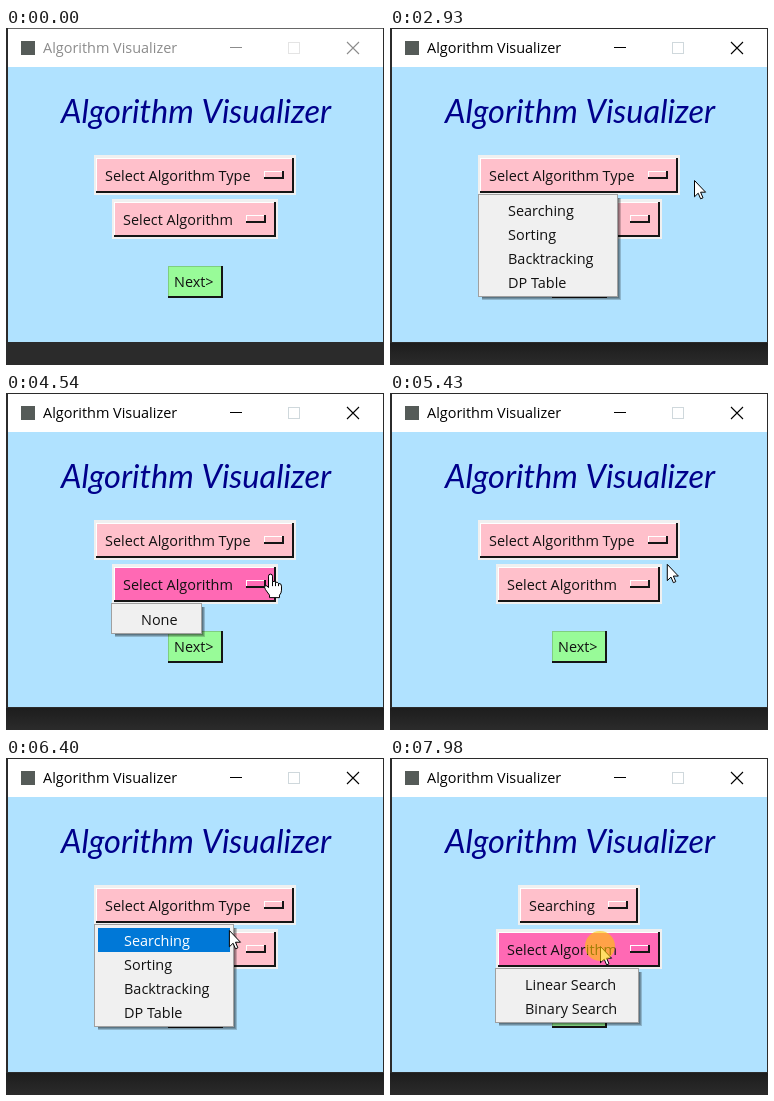
These frames come from a looping animation (378 px wide and 337 px high, 8000 ms). An HTML page with a canvas:

```html
<!DOCTYPE html>
<html lang="en">
<head>
<meta charset="utf-8">
<title>Algorithm Visualizer</title>
<style>
html, body { margin: 0; width: 100%; height: 100%; overflow: hidden; background: #2b2b2b; }
canvas { display: block; }
</style>
</head>
<body>
<canvas id="stage" width="378" height="337"></canvas>
<script>
const ctx = document.getElementById('stage').getContext('2d');
const LOOP = 8000;
const PINK = '#ffc0cb', HOT = '#ff69b4';
const UI = '14.45px "Open Sans", "Noto Sans", sans-serif';
const HEADING = 'italic 32.5px Lato, "Open Sans", sans-serif';

// Pointer path: time, x, y
const path = [
  [840, 190, 37], [1020, 190, 248], [1250, 183, 156],
  [2500, 183, 156], [2900, 304, 152],
  [3440, 304, 152], [3700, 260, 180],
  [4539, 260, 180], [4540, 264, 181], [4770, 321, 197],
  [5429, 321, 197], [5430, 277, 171], [5710, 246, 152],
  [6300, 246, 152], [6400, 223, 172], [6630, 210, 175],
  [7470, 210, 175], [7600, 210, 188]
];

// Click halo: on, off
const clicks = [
  [1580, 1860], [3060, 3290], [3980, 4180], [5000, 5200],
  [5890, 6120], [6810, 7040], [7830, LOOP]
];

// open..full is the fade in; the pointer stays an arrow until "moved"
const types = ['Searching', 'Sorting', 'Backtracking', 'DP Table'];
const menus = [
  { x: 88, y: 166, w: 140, items: types, open: 1860, full: 2040, moved: 2500, close: 3060 },
  { x: 105, y: 210, w: 91, items: ['None'], open: 4000, full: 4180, moved: 4540, close: 5000 },
  { x: 88, y: 166, w: 140, items: types, open: 5920, full: 6120, moved: 6300, close: 7040 },
  { x: 105, y: 210, w: 144, items: ['Linear Search', 'Binary Search'],
    open: 7840, full: 7970, moved: LOOP, close: LOOP }
];
const ROW = 24, ACTIVE = 1600, PICKED = 7040, PICK_FADE = 280;

const arrow = new Path2D('M.5 .5V16.8L4.2 13.2L6.6 18.8L9 17.8L6.6 12.2H11.6Z');
const hand = new Path2D(
  'M-2 2Q-2 0 0 0Q2 0 2 2V7.5Q4 6.5 5 8.3Q7 7.3 8 9.3Q11 9 11 12V16Q11 19 9 21V23.5H-1V21' +
  'L-5 15.5Q-7 12.5 -5 11.5Q-3.5 11 -2 13.5Z');
const knuckles = new Path2D('M2 7.5V12M5 8.3V12M8 9.3V12');

const clamp = v => Math.max(0, Math.min(1, v));
const inside = (p, x, y, w, h) => p && p.x >= x && p.x < x + w && p.y >= y && p.y < y + h;

function rect(x, y, w, h, color) {
  ctx.fillStyle = color;
  ctx.fillRect(x, y, w, h);
}

function text(str, x, y, color = '#111', font = UI, align = 'left') {
  ctx.font = font;
  ctx.textAlign = align;
  ctx.fillStyle = color;
  ctx.fillText(str, x, y);
}

function lines(color, width, ...segments) {
  ctx.strokeStyle = color;
  ctx.lineWidth = width;
  ctx.beginPath();
  for (const [x1, y1, x2, y2] of segments) {
    ctx.moveTo(x1, y1);
    ctx.lineTo(x2, y2);
  }
  ctx.stroke();
}

function pointerAt(t) {
  if (t < path[0][0]) return null;
  let i = path.length - 1;
  while (path[i][0] > t) i--;
  const a = path[i], b = path[i + 1] || a;
  const k = b === a ? 0 : (t - a[0]) / (b[0] - a[0]);
  const e = k * (2 - k);
  return { x: a[1] + (b[1] - a[1]) * e, y: a[2] + (b[2] - a[2]) * e };
}

function drawWindow(active) {
  rect(0, 0, 378, 337, '#2b2b2b');
  if (active) {
    const shade = ctx.createLinearGradient(0, 315, 0, 337);
    shade.addColorStop(0, '#1d1d1d');
    shade.addColorStop(1, '#2b2b2b');
    rect(0, 315, 378, 22, shade);
  }
  rect(2, 1, 375, 38, '#fff');
  rect(2, 39, 375, 275, '#b0e2ff');
  if (!active) rect(2, 0, 375, 1, '#666');

  const ink = active ? '#000' : '#8c8c8c';
  rect(15, 13, 14, 14, '#555b58');
  text('Algorithm Visualizer', 37, 25, ink);
  lines(ink, 1, [224, 19.5, 236, 19.5]);
  ctx.strokeStyle = active ? '#cfd8dc' : '#e4e4e4';
  ctx.strokeRect(282.5, 14.5, 11, 11);
  lines(ink, 1.1, [341, 14, 353, 26], [353, 14, 341, 26]);

  text('Algorithm Visualizer', 190, 95, '#00008b', HEADING, 'center');
}

function raised(x, y, w, h, face, light, edge) {
  rect(x, y, w, h, '#151515');
  rect(x, y, w - edge, h - edge, light);
  rect(x + 1, y + 1, w - edge - 1, h - edge - 1, face);
}

function optionButton(label, x, y, w, hot) {
  const face = hot ? HOT : PINK;
  rect(x, y, w, 40, '#f0f0f0');
  raised(x + 2, y + 3, w - 4, 35, face, '#fff', 2);
  text(label, x + 11, y + 26);
  raised(x + w - 32, y + 16, 20, 8, face, '#fff', 2);
}

function menuRow(m, i, lit) {
  const y = m.y + 4 + i * ROW;
  if (lit) rect(m.x + 4, y, m.w - 8, ROW, '#0078d7');
  text(m.items[i], m.x + 30, y + 17.5, lit ? '#fff' : '#111');
}

function drawMenu(m, t, p) {
  const h = m.items.length * ROW + 7;
  ctx.globalAlpha = clamp((t - m.open) / (m.full - m.open));
  for (let s = 1; s <= 3; s++) rect(m.x + 4, m.y + 4, m.w - 4 + s, h - 4 + s, 'rgba(0,0,0,.2)');
  rect(m.x, m.y, m.w, h, '#a0a0a0');
  rect(m.x + 1, m.y + 1, m.w - 2, h - 2, '#f0f0f0');
  m.items.forEach((_, i) => {
    menuRow(m, i, inside(p, m.x, m.y + 4 + i * ROW, m.w, ROW));
  });
  ctx.globalAlpha = 1;
}

function drawPointer(p, useHand) {
  ctx.save();
  ctx.translate(p.x, p.y);
  ctx.lineWidth = 1;
  ctx.lineJoin = 'round';
  ctx.fillStyle = '#fff';
  ctx.strokeStyle = '#000';
  const shape = useHand ? hand : arrow;
  ctx.fill(shape);
  ctx.stroke(shape);
  if (useHand) ctx.stroke(knuckles);
  ctx.restore();
}

function draw(t) {
  const p = pointerAt(t);
  const menu = menus.find(m => t >= m.open && t < m.close);
  const covered = menu && inside(p, menu.x, menu.y, menu.w, menu.items.length * ROW + 7);
  const over = (...box) => !covered && inside(p, ...box);
  const picked = t >= PICKED;
  const first = picked ? ['Searching', 128, 122] : ['Select Algorithm Type', 88, 202];
  const hot1 = over(first[1] + 2, 130, first[2] - 4, 35);
  const hot2 = over(108, 174, 162, 35);
  const onNext = over(162, 238, 55, 32);

  drawWindow(t >= ACTIVE);
  optionButton(first[0], first[1], 127, first[2], hot1);
  optionButton('Select Algorithm', 106, 171, 166, hot2);
  raised(162, 238, 55, 32, '#98fb98', '#7fce7f', 2);
  text('Next>', 168, 259);

  if (menu) drawMenu(menu, t, p);
  if (picked && t < PICKED + PICK_FADE) {
    ctx.globalAlpha = 1 - (t - PICKED) / PICK_FADE;
    menuRow(menus[2], 0, true);
    ctx.globalAlpha = 1;
  }
  if (!p) return;

  const held = menu && t < menu.moved;
  drawPointer(p, !held && (hot1 || hot2 || onNext));
  if (clicks.some(([on, off]) => t >= on && t < off)) {
    ctx.fillStyle = 'rgba(255,200,0,.6)';
    ctx.beginPath();
    ctx.arc(p.x, p.y, 15, 0, Math.PI * 2);
    ctx.fill();
  }
}

const start = performance.now();
function tick() {
  draw((performance.now() - start) % LOOP);
  requestAnimationFrame(tick);
}
tick();
</script>
</body>
</html>
```
